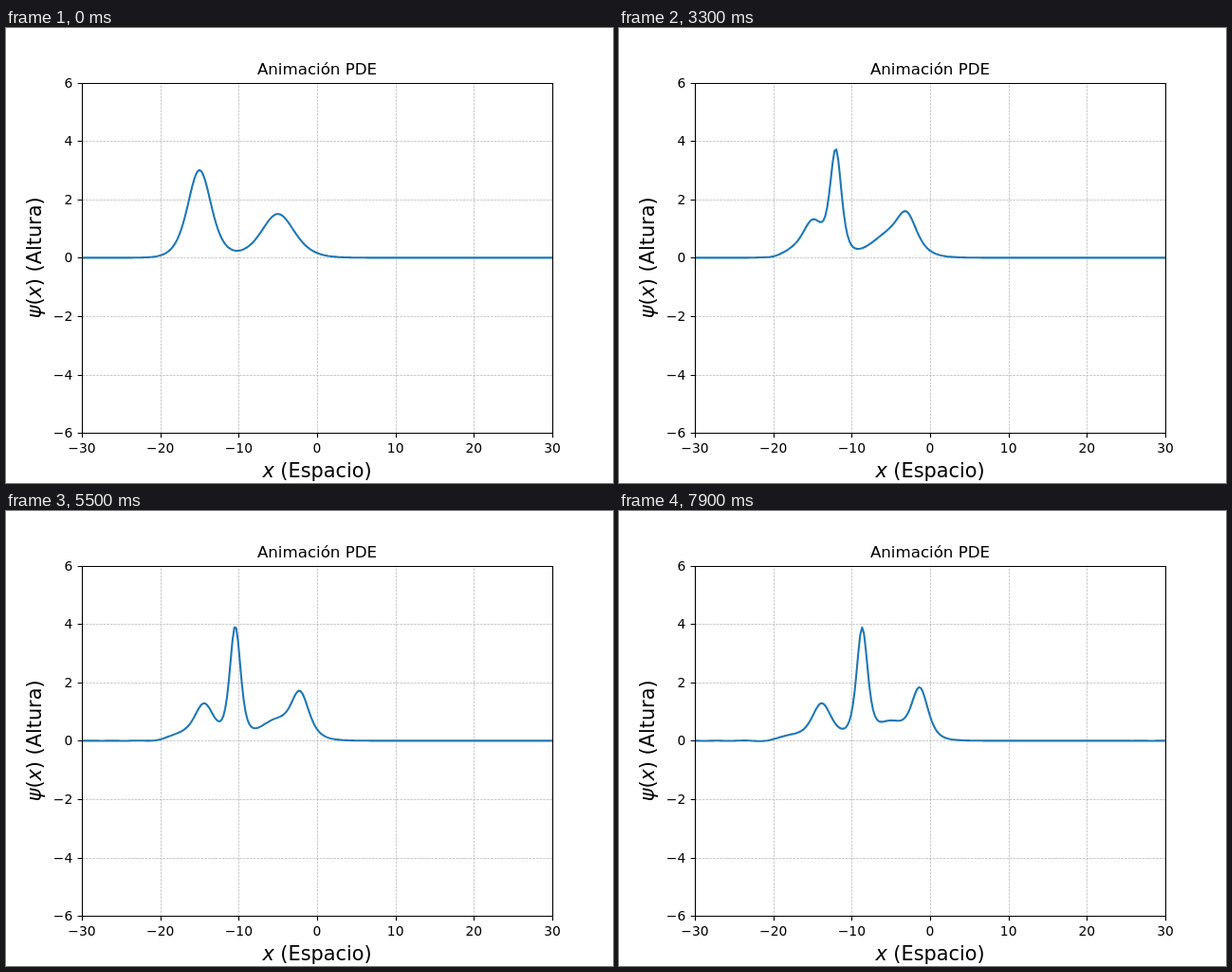
Recreate the animation shown at these times as an HTML page. Size 640 by 480 pixels, loop 8000 ms.

```html
<!DOCTYPE html>
<html lang="es">
<head>
<meta charset="utf-8">
<title>Animación PDE</title>
<style>
  html, body { margin: 0; width: 100%; height: 100%; overflow: hidden; background: #fff; }
  svg { display: block; width: 640px; height: 480px; }
  text { font: 13.89px "DejaVu Sans", sans-serif; text-anchor: middle; }
  .title { font-size: 16.67px; }
  .label { font-size: 20.83px; }
  .tick { text-anchor: end; }
  .math { font-style: italic; }
  path { fill: none; stroke: #000; stroke-width: 1.11; }
  #grid { stroke: #b0b0b0; stroke-width: .69; stroke-dasharray: 2.57 1.11; }
  #curve { stroke: #1f77b4; stroke-width: 2.083; stroke-linejoin: round; }
</style>
</head>
<body>
<svg viewBox="0 0 640 480">
  <path id="grid"/>
  <path id="curve"/>
  <path id="axes"/>
  <g id="ticks"></g>
  <text class="title" x="328" y="49">Animación PDE</text>
  <text class="label" x="328" y="474"><tspan class="math">x</tspan> (Espacio)</text>
  <text class="label" transform="translate(37 242.4) rotate(-90)"><tspan class="math">ψ</tspan>(<tspan class="math">x</tspan>) (Altura)</text>
</svg>
<script>
const byId = id => document.getElementById(id);
const px = x => 328 + x * 496 / 60;
const py = y => 242.4 - y * 30.8;
const snap = v => Math.floor(v + .5) + .5;
const left = snap(px(-30)), right = snap(px(30));
const top_ = snap(py(6)), bottom = snap(py(-6));

function drawAxes() {
  let grid = '', axes = `M${left} ${top_}H${right}V${bottom}H${left}Z`, labels = '';
  const name = v => String(v).replace('-', '\u2212');
  for (let i = -3; i <= 3; i++) {
    const x = snap(px(10 * i)), y = snap(py(2 * i));
    if (Math.abs(i) < 3) grid += `M${x} ${bottom}V${top_}M${left} ${y}H${right}`;
    axes += `M${x} ${bottom}v4.86M${left} ${y}h-4.86`;
    labels += `<text x="${px(10 * i)}" y="448">${name(10 * i)}</text>` +
      `<text class="tick" x="70.3" y="${Math.round(py(2 * i) + 5)}">${name(2 * i)}</text>`;
  }
  byId('grid').setAttribute('d', grid);
  byId('axes').setAttribute('d', axes);
  byId('ticks').innerHTML = labels;
}

// Korteweg-de Vries: u_t + u u_x + u_xxx / 4 = 0 on a periodic grid
const N = 256, h = 60 / N, DISPERSION = .25;
const FRAMES = 80, FRAME_MS = 100, SUBSTEPS = 5, dt = .05 / SUBSTEPS;
const soliton = (x, c) => 3 * c / Math.cosh(Math.sqrt(c) / 2 * x) ** 2;

function slope(u) {
  return u.map((_, i) => {
    const at = k => u[(i + k + N) % N];
    const a = at(-3), b = at(-2), c = at(-1), d = at(1), e = at(2), f = at(3);
    const flux = (b * b - 8 * c * c + 8 * d * d - e * e) / (24 * h);
    const third = (a - 8 * b + 13 * c - 13 * d + 8 * e - f) / (8 * h ** 3);
    return -flux - DISPERSION * third;
  });
}

function step(u) {
  const add = (k, s) => u.map((v, i) => v + s * k[i]);
  const k1 = slope(u), k2 = slope(add(k1, dt / 2));
  const k3 = slope(add(k2, dt / 2)), k4 = slope(add(k3, dt));
  return u.map((v, i) => v + dt / 6 * (k1[i] + 2 * k2[i] + 2 * k3[i] + k4[i]));
}

function curvePath(u) {
  const points = Array.from(u, (v, i) => `${px(-30 + i * h).toFixed(2)} ${py(v).toFixed(2)}`);
  return `M${points.join('L')}L576 ${py(u[0]).toFixed(2)}`;
}

function solve() {
  let u = Float64Array.from({ length: N }, (_, i) => {
    const x = -30 + i * h;
    return soliton(x + 15, 1) + soliton(x + 5, .5);
  });
  const paths = [];
  for (let n = 0; n < FRAMES; n++) {
    paths.push(curvePath(u));
    for (let s = 0; s < SUBSTEPS; s++) u = step(u);
  }
  return paths;
}

drawAxes();
const paths = solve();
const start = performance.now();

function draw() {
  const n = Math.floor((performance.now() - start) / FRAME_MS) % FRAMES;
  byId('curve').setAttribute('d', paths[n]);
  requestAnimationFrame(draw);
}
draw();
</script>
</body>
</html>
```
